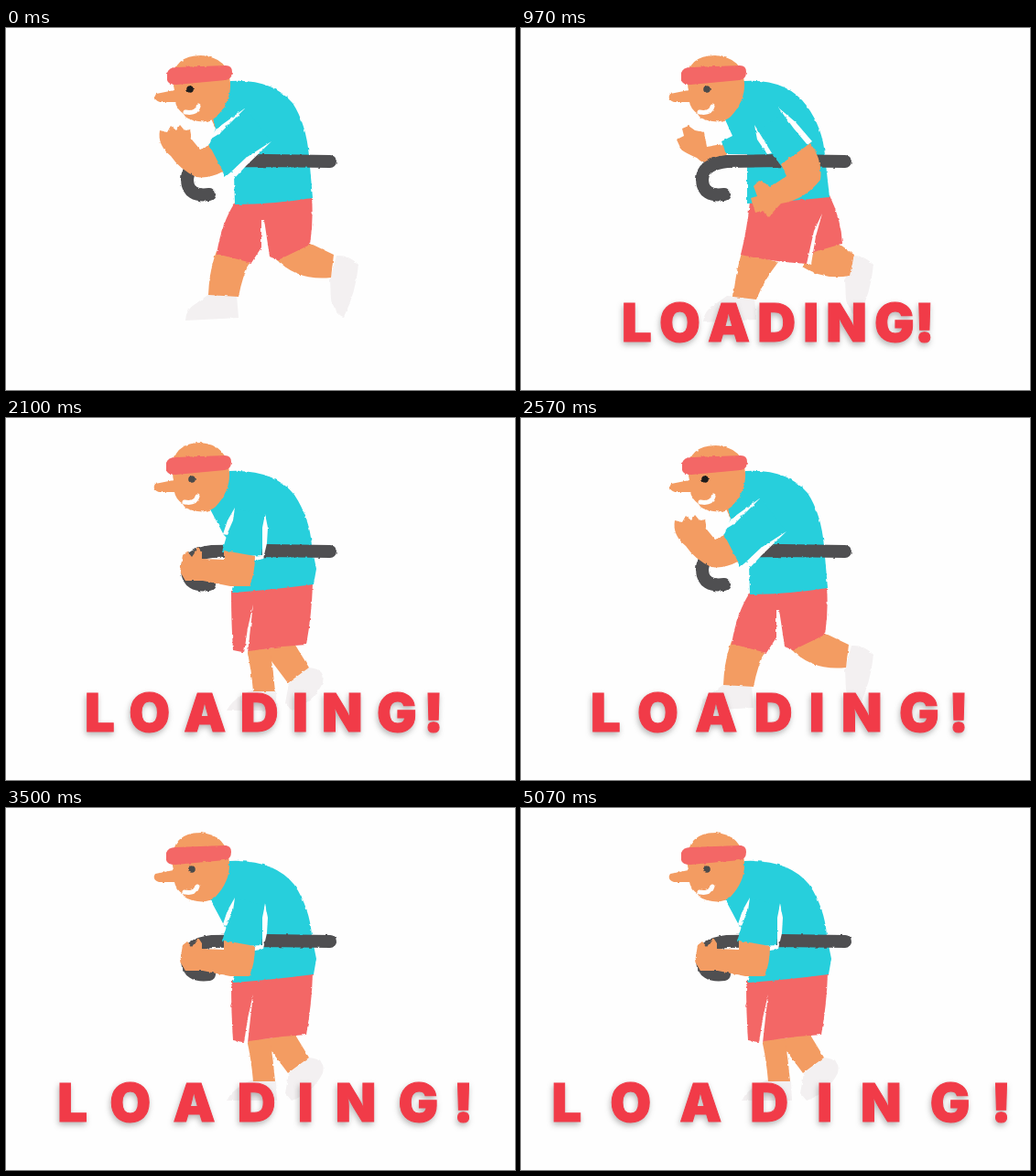
Recreate the animation shown at these times as an HTML page. Size 556 by 396 pixels, loop 5.11 s.

```html
<!DOCTYPE html>
<html lang="en">
<head>
<meta charset="utf-8">
<title>Loading</title>
<style>
  html, body { margin: 0; width: 100%; height: 100%; overflow: hidden; background: #fefefe; }
  svg { display: block; width: 556px; height: 396px; }
  .skin { fill: #f39c62; }
  .shirt { fill: #27cfdc; }
  .red { fill: #f36766; }
  .shoe { fill: #f3f0f1; }
  .gap { fill: #fefefe; }
  .cane { fill: none; stroke: #4f4f51; stroke-width: 14; stroke-linecap: round; }
  .smile { fill: none; stroke: #fefefe; stroke-width: 5; stroke-linecap: round; }
  text {
    font: 900 58px Inter, "Liberation Sans", sans-serif;
    font-kerning: none;
    fill: #f13b48; stroke: #f13b48; stroke-width: 1;
    filter: drop-shadow(-1px 3px 3px rgba(50, 50, 50, .35));
  }
</style>
</head>
<body>
<svg viewBox="0 0 556 396">
  <defs>
    <filter id="rough" filterUnits="userSpaceOnUse" x="0" y="0" width="556" height="396" color-interpolation-filters="sRGB">
      <feTurbulence id="noise" type="fractalNoise" baseFrequency=".2" numOctaves="2"/>
      <feDisplacementMap in="SourceGraphic" scale="2.6" xChannelSelector="R" yChannelSelector="G"/>
    </filter>
  </defs>
  <g id="walker" filter="url(#rough)"></g>
  <text id="label" y="343">LOADING<tspan dx="-8">!</tspan></text>
</svg>
<script>
const LOOP = 5110, HOLD = 80;
const $ = id => document.getElementById(id);
const walker = $('walker'), noise = $('noise'), label = $('label');

const shape = (cls, d) => `<path class="${cls}" d="${d}"/>`;
const shift = (x, y, content) => `<g transform="translate(${x} ${y})">${content}</g>`;

const head = (x, top, eyeX, eyeColor) => shift(x, 0,
  shape('skin', `M182 58Q183 ${top} 213 ${top}Q243 ${top + 2} 245 60Q246 80 230 97Q222 104 210 102Q196 100 194 94Q186 88 185 81L168 81Q160 78 164 72L184 68Z`) +
  shape('red', 'M176 49Q178 43 186 43L240 41Q247 41 247 48Q247 56 240 57L186 62Q177 62 176 57Z') +
  shape('smile', 'M196 92Q208 94 210 86')) +
  `<circle cx="${eyeX}" cy="67" r="3.8" fill="${eyeColor}"/>`;

const cane = shape('cane', 'M222 182Q199 185 198 167Q197 149 225 146L285 145L354 146');

const frontShoe = shape('shoe', 'M222 291L252 293L254 317L196 320Q196 308 208 301Z');
const backShoe = shape('shoe', 'M361 249Q375 248 385 259Q382 290 369 316Q362 315 355 298L354 275Z');

const armUp = frontShoe + backShoe +
  shape('skin', 'M230 244L267 254Q258 272 254 294L221 292Q222 265 230 244Z') +
  shape('skin', 'M294 252L331 235L358 248L355 273Q318 277 294 252Z') +
  shape('red', 'M250 191L334 184Q336 212 332 237L297 254L288 250L282 210L279 210L279 240L268 257L230 247Q236 212 250 191Z') +
  shape('skin', 'M222 95L245 75L244 112L229 110Z') +
  shape('shirt', 'M245 58Q290 55 313 82Q328 105 331 140L335 186Q290 193 250 193L249 160L238 140L222 128L229 110L226 98Q232 88 245 58Z') +
  cane +
  shape('shirt', 'M262 88L221 128L239 163L290 124Z') +
  shape('gap', 'M262 87L230 110L221 123L234 115Z') +
  shape('gap', 'M290 124L262 142L239 164L249 165L263 150Z') +
  shape('skin', 'M222 128L237 157Q222 165 208 163Q190 155 180 140Q165 128 168 112L176 114L180 107L186 112L190 106L195 112L201 111L203 122L212 133Z') +
  head(0, 30, 201, '#1c1c1c');

const armBack = shift(3, 2, frontShoe) + backShoe +
  shape('skin', 'M241 246L281 256Q266 275 257 297L232 294Q234 270 241 246Z') +
  shape('skin', 'M316 244L346 235L364 248L359 271Q330 276 307 261Z') +
  shape('red', 'M250 190L337 183Q350 210 351 236L320 245L313 258Q275 256 240 248Q247 220 250 190Z') +
  shape('gap', 'M329 203L320 222L312 258L317 258L322 228Z') +
  shape('skin', 'M226 126L224 142Q206 156 192 142Q180 137 175 133L170 122L178 118L176 110L183 107L190 112L200 114L203 130Z') +
  shape('shirt', 'M243 58Q290 55 312 85Q330 110 332 140L337 185Q290 190 247 192L247 138L224 138L219 124L231 118L222 98Q232 90 243 58Z') +
  cane +
  shape('shirt', 'M262 110L276 140L285 152L318 126L290 90Z') +
  shape('gap', 'M255 106L263 119L274 137L269 138L258 122Z') +
  shape('gap', 'M281 87L300 103L318 124L313 128L298 110Z') +
  shape('skin', 'M284 149L316 126Q330 145 327 166Q310 188 284 192L270 207L264 200L256 202L251 186L258 184L254 173L260 167L267 170L272 174L290 162Z') +
  head(-1, 30, 203, '#4a4a4a');

const passing =
  shape('shoe', 'M331 273Q350 275 346 290Q335 312 312 320L305 312L309 290Z') +
  shape('shoe', 'M270 297L295 299L296 320L241 320Q248 306 270 297Z') +
  shape('skin', 'M281 254L314 245L331 273L308 290Z') +
  shape('skin', 'M263 253L288 252Q292 275 294 299L270 299Q268 275 263 253Z') +
  shape('red', 'M246 189L335 181Q334 215 328 248L302 250L258 256L248 254Q246 225 246 189Z') +
  shape('gap', 'M270 204L264 230L260 257L264 257L267 230Z') +
  shape('shirt', 'M244 58Q293 56 315 84Q332 110 334 140L339 165L336 182Q290 188 247 191L250 180L250 140L238 128L222 98Q230 90 244 58Z') +
  cane +
  shape('shirt', 'M250 99L236 146L279 153L283 106Z') +
  shape('gap', 'M250 98L242 112L237 127L241 128L248 112Z') +
  shape('gap', 'M283 105L280 120L280 150L264 151L272 156L281 154L285 137L286 120Z') +
  shape('skin', 'M238 145L272 151Q272 170 266 184L245 184L215 178L196 178L190 168L193 150L198 146L203 152L210 142L214 148L214 154L238 155Z') +
  head(-1, 27, 203, '#4a4a4a');

// Each drawing is held for two ticks; the outline wobbles on every tick.
const cycle = [armUp, passing, armBack, passing];
const naturalWidth = label.getBBox().width;
let lastTick = -1;

function draw(now) {
  const t = now % LOOP;
  const tick = Math.floor(t / HOLD);
  if (tick !== lastTick) {
    lastTick = tick;
    walker.innerHTML = cycle[(tick >> 1) % 4];
    noise.setAttribute('seed', 3 + tick % 2);
  }

  // The letters drift apart at a steady speed, then rest.
  const width = Math.min(291.5 + .0445 * t, 495);
  const center = 280 + (width - 336) * .022;
  label.setAttribute('x', center - width / 2 - 2.5);
  label.style.letterSpacing = (width + 7 - naturalWidth) / 7 + 'px';
  label.style.opacity = Math.max(0, Math.min((t - 60) / 440, 1));
}

const start = performance.now();
function loop() {
  draw(performance.now() - start);
  requestAnimationFrame(loop);
}
loop();
</script>
</body>
</html>
```
